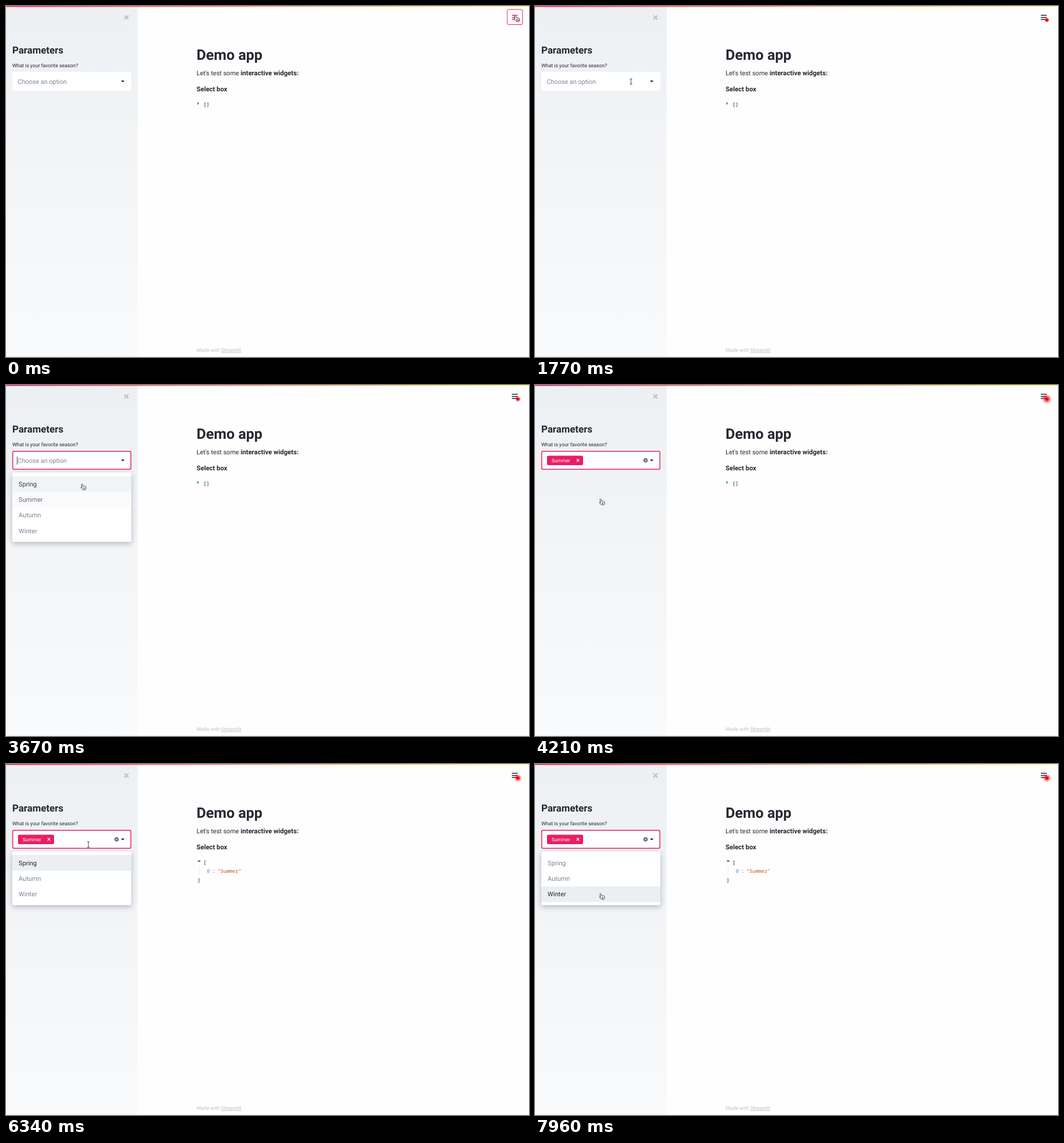
Write an HTML page that moves like this. It is 914 by 613 pixels and loops after 8 s.

```html
<!DOCTYPE html>
<html lang="en">
<head>
<meta charset="utf-8">
<title>Demo app</title>
<style>
html, body { margin: 0; width: 100%; height: 100%; overflow: hidden; background: #fefefe; }
svg { display: block; width: 100vw; height: 100vh; }
text { font-family: Roboto, "Open Sans", sans-serif; font-size: 11px; fill: #262730; text-rendering: geometricPrecision; white-space: pre; }
.bold { font-weight: 700; }
.small { font-size: 8.8px; }
.hint { fill: #808495; }
.mono text { font: 8.7px "Noto Sans Mono", "DejaVu Sans Mono", monospace; }
.panel { filter: drop-shadow(0 3px 5px rgba(30, 35, 60, .3)); }
.line { fill: none; stroke: #262730; }
.cursor { fill: #fff; stroke: #333; stroke-width: .9; stroke-linejoin: round; stroke-linecap: round; }
</style>
</head>
<body>
<svg viewBox="0 0 914 613">
  <defs>
    <linearGradient id="side" x2="0" y2="1">
      <stop stop-color="#edf0f2"/><stop offset="1" stop-color="#f9fafc"/>
    </linearGradient>
    <linearGradient id="bar">
      <stop stop-color="#f02066"/><stop offset=".5" stop-color="#fb9a70"/><stop offset="1" stop-color="#fffb80"/>
    </linearGradient>
    <radialGradient id="halo">
      <stop offset=".3" stop-color="#f00" stop-opacity=".75"/><stop offset="1" stop-color="#f00" stop-opacity="0"/>
    </radialGradient>
  </defs>
  <rect width="914" height="613" fill="#fefefe"/>
  <rect width="230" height="613" fill="url(#side)"/>
  <path d="M0 612.5H914" stroke="#eff0f2"/>
  <rect width="914" height="1.6" fill="url(#bar)"/>

  <path d="M207 16.5l7 7m0-7l-7 7" stroke="#bcc1c8" stroke-width="2.2"/>
  <text class="bold" x="11" y="83" style="font-size:17.1px">Parameters</text>
  <text class="small" x="11" y="106.8">What is your favorite season?</text>

  <rect id="field" x="11.7" y="115.7" width="206.6" height="31.6" rx="2.5" fill="#fff" stroke-width="1.5"/>
  <text id="hint" class="hint" x="20.5" y="135.8">Choose an option</text>
  <path id="caret" d="M19.5 125v14" stroke="#262730" stroke-width=".9"/>
  <g id="tag">
    <rect x="21" y="123.5" width="63" height="16.5" rx="2.5" fill="#e91e63"/>
    <text x="29" y="135" style="font-size:8.6px;fill:#fff">Summer</text>
    <path d="M72.6 129.1l4.8 4.8m0-4.8l-4.8 4.8" stroke="#fff" stroke-width="1.2"/>
    <circle cx="193.2" cy="131.6" r="3.8" fill="#666b86"/>
    <path d="M191.8 130.2l2.8 2.8m0-2.8l-2.8 2.8" stroke="#fff" stroke-width=".9"/>
  </g>
  <path d="M201 130.2h6l-3 3z" fill="#111"/>

  <text class="bold" x="333" y="94" style="font-size:25.4px">Demo app</text>
  <text x="333" y="121.3">Let's test some </text>
  <text class="bold" x="410" y="121.3" style="font-size:11.5px">interactive widgets:</text>
  <text class="bold" x="333" y="149.3" style="font-size:11.4px">Select box</text>
  <g id="closed" class="mono">
    <path d="M334.3 167.2l3.4 2.9l-3.4 2.9z" fill="#35a58c"/>
    <text x="345" y="174.6">[]</text>
  </g>
  <g id="opened" class="mono">
    <path d="M334.4 168.4h6.2l-3.1 3.2z" fill="#50545c"/>
    <path d="M337.5 178v17" stroke="#ebebeb"/>
    <text x="345" y="174.6">[</text>
    <text x="351" y="190.4" style="fill:#8488c8">0</text>
    <text x="360.5" y="190.4">:</text>
    <text x="369.5" y="190.4" style="fill:#cb4b16">"Summer"</text>
    <text x="334.5" y="206.4">]</text>
  </g>
  <text class="small" x="333" y="603.8" style="fill:#bcc1c8">Made with <tspan text-decoration="underline">Streamlit</tspan></text>

  <rect id="hover" x="876" y="6" width="26.7" height="26.5" rx="2.7" fill="#fff" stroke="#e91e63"/>
  <path id="burger" class="line" d="M884 16.2h10.3m-10.3 3.7h10.3m-10.3 3.7h10.3" stroke-width="1.5"/>
  <circle id="glow" cx="894.6" cy="24.5" fill="url(#halo)"/>
  <circle cx="894.6" cy="24.5" r="2.8" fill="#f5061c"/>

  <g id="menus"></g>
  <g id="pointer">
    <path id="hand" class="cursor" d="M-2.4 1.2L-3.6-3.4q-.2-1.4 .9-1.5q.8 0 1.1 1L-.8-1q1-.9 1.8 0q1-.7 1.7.2q1.2-.4 1.6 .7q.7 2 .2 3.6L3.8 5.2H-1L-4 2.1q-.8-1 0-1.5q.6-.3 1.6.6zM.4 1.5v2m1.5-2v2"/>
    <path id="beam" class="line" d="M-2-5q2 0 2 1.2q0-1.2 2-1.2M0-4V4M-2 5q2 0 2-1.2q0 1.2 2 1.2" stroke-width=".9"/>
    <path id="arrow" d="M-3-5V4.5L-.8 2.6L.6 5.8L2.2 5.1L.8 2H3.8z" fill="#111" stroke="#fff" stroke-width=".7"/>
  </g>
</svg>
<script>
const LOOP = 8000, FOCUS = 2510, PICK = 4180, RERUN = 5850, REOPEN = 6190;
const ROW = 27.4, TOP = 159;
const $ = id => document.getElementById(id);
const clamp = v => Math.max(0, Math.min(1, v));
const ease = v => v * v * (3 - 2 * v);
const show = (id, on) => $(id).setAttribute('visibility', on ? 'visible' : 'hidden');
const mix = (a, b, k) => `rgb(${a.map((v, i) => Math.round(v + (b[i] - v) * k))})`;

// each option is highlighted from its first to its second time
const menus = [
  { from: FOCUS, to: PICK, rows: [['Spring', 0, 3620], ['Summer', 3620, 9e3], ['Autumn', 9e3, 9e3], ['Winter', 9e3, 9e3]] },
  { from: REOPEN, to: LOOP, rows: [['Spring', 0, 6540], ['Autumn', 6540, 6710], ['Winter', 6710, 9e3]] }
];

// time, x, y of the pointer
const path = [
  [0, 892, 21], [150, 892, 21], [1150, 168, 132], [3340, 167, 132], [3900, 117, 204],
  [4350, 117, 204], [5300, 146, 133], [6230, 146, 133], [6810, 125, 212], [7200, 117, 231], [LOOP, 117, 231]
];

function add(parent, tag, attrs) {
  const el = document.createElementNS('http://www.w3.org/2000/svg', tag);
  for (const k in attrs) el.setAttribute(k, attrs[k]);
  return parent.appendChild(el);
}

for (const menu of menus) {
  menu.el = add($('menus'), 'g', { class: 'panel' });
  add(menu.el, 'rect', { x: 11, y: 152.7, width: 208, height: menu.rows.length * ROW + 11.6, rx: 2.5, fill: '#fff' });
  menu.items = menu.rows.map(([name], i) => {
    const y = TOP + i * ROW;
    const back = add(menu.el, 'rect', { x: 11, y, width: 208, height: ROW, fill: '#eceff2' });
    const label = add(menu.el, 'text', { x: 22, y: y + 17.6, style: 'font-size:11.2px' });
    label.textContent = name;
    return { back, label };
  });
}

function drawMenu({ el, from, to, rows, items }, t) {
  const open = t >= from && t < to;
  el.setAttribute('visibility', open ? 'visible' : 'hidden');
  el.setAttribute('opacity', clamp((t - from) / 120));
  rows.forEach(([, start, end], i) => {
    const level = clamp((t - start) / 200) * (1 - clamp((t - end) / 200));
    items[i].back.setAttribute('opacity', level);
    items[i].label.style.fill = mix([128, 132, 149], [38, 39, 48], level);
  });
}

function drawPointer(t) {
  const n = path.findIndex(p => p[0] > t);
  const [t0, x0, y0] = path[n - 1], [t1, x1, y1] = path[n];
  const k = ease((t - t0) / (t1 - t0));
  const x = x0 + (x1 - x0) * k, y = y0 + (y1 - y0) * k;
  const inMenuButton = x > 876 && y < 33;
  const inField = x > 11 && x < 219 && y > 115 && y < 148;
  const inList = y > 153 && (t > FOCUS && t < 4360 || t > REOPEN);
  $('pointer').setAttribute('transform', `translate(${x} ${y})`);
  show('hand', inMenuButton || inList);
  show('beam', inField);
  show('arrow', !inMenuButton && !inList && !inField);
  show('hover', inMenuButton);
  $('burger').style.stroke = inMenuButton ? '#e91e63' : '#262730';
}

function draw(t) {
  $('field').setAttribute('stroke', t < FOCUS ? '#fff' : '#e91e63');
  show('hint', t < PICK);
  show('caret', t >= FOCUS && t < PICK && (t - FOCUS) % 1000 < 500);
  show('tag', t >= PICK);
  show('closed', t < RERUN);
  show('opened', t >= RERUN);
  $('glow').setAttribute('r', 6.5 - 2 * Math.cos((t - 90) / 1680 * 2 * Math.PI));
  menus.forEach(menu => drawMenu(menu, t));
  drawPointer(t);
}

const begin = performance.now();
function tick() {
  draw((performance.now() - begin) % LOOP);
  requestAnimationFrame(tick);
}
tick();
</script>
</body>
</html>
```
